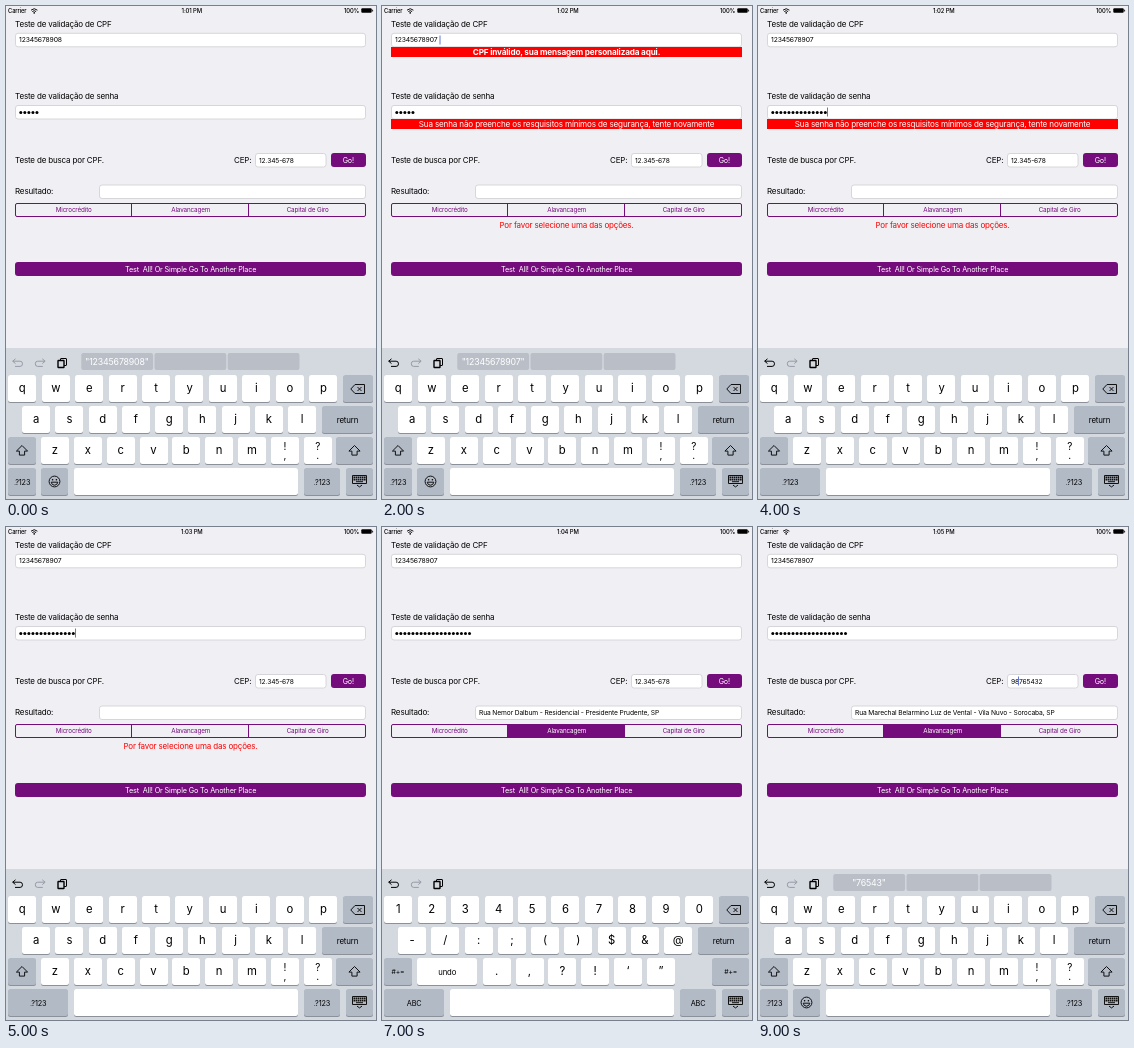
An HTML page that plays this animation: 370 px wide and 493 px high, repeating every 10000 ms.

```html
<!DOCTYPE html>
<html lang="pt-BR">
<head>
<meta charset="utf-8">
<title>Teste de validação</title>
<style>
  html, body { margin: 0; width: 100%; height: 100%; overflow: hidden; background: #efeff4; }
  svg { display: block; width: 100%; height: 100%; }
  text { font-family: Inter, sans-serif; font-size: 8px; letter-spacing: -.02em; white-space: pre; }
  .mid { text-anchor: middle; }
  .line { fill: none; stroke: #111; stroke-width: 1; }
</style>
</head>
<body>
<svg id="stage" viewBox="0 0 370 493"></svg>
<script>
const PURPLE = '#750c7b', RED = '#ff0000', WHITE = '#fff', DARK_KEY = '#b2bac6';
const BOLD = 'font-weight="700"', MEDIUM = 'font-weight="500"';

const rect = (x, y, w, h, fill, r = 0, extra = '') =>
  `<rect x="${x}" y="${y}" width="${w}" height="${h}" rx="${r}" fill="${fill}" ${extra}/>`;
const text = (x, y, str, size = 8, fill = '#000', extra = '') =>
  `<text x="${x}" y="${y}" style="font-size:${size}px;fill:${fill}" ${extra}>${str}</text>`;
const mid = (x, y, str, size, fill, extra = '') => text(x, y, str, size, fill, 'class="mid" ' + extra);
const icon = (x, y, d, color = '#111') =>
  `<path class="line" transform="translate(${x} ${y})" d="${d}" style="stroke:${color}"/>`;
const field = (x, y, w) => rect(x, y, w, 13.5, WHITE, 2.5, 'stroke="#cfcfd2" stroke-width=".8"');

const BASE = {
  clock: '1:01', cpf: '12345678908', dots: 5, cep: '12.345-678', result: '',
  cpfError: false, passError: false, choiceError: false, chosen: false,
  undo: false, hint: '', numeric: false, emoji: true, caret: null
};
const CPF_CARET = [58, 34], PASS_CARET = [69.5, 106], CEP_CARET = [260.5, 154];

// Each step lasts one second and changes only the listed properties.
const STEPS = [
  { hint: '12345678908' },
  { clock: '1:02', cpfError: true, passError: true, choiceError: true, caret: CPF_CARET },
  { cpf: '12345678907', hint: '12345678907', undo: true },
  { cpfError: false, caret: null },
  { dots: 14, hint: '', emoji: false, caret: PASS_CARET },
  { clock: '1:03', passError: false },
  { clock: '1:04', dots: 19, choiceError: false, chosen: true, numeric: true, caret: null },
  { result: 'Rua Nemor Dalbum - Residencial - Presidente Prudente, SP' },
  { clock: '1:05', cep: '98765432', hint: '76543', numeric: false, emoji: true, caret: CEP_CARET },
  { result: 'Rua Marechal Belarmino Luz de Vental - Vila Nuvo - Sorocaba, SP' }
];
let current = BASE;
const STATES = STEPS.map(step => current = { ...current, ...step });

function statusBar(s) {
  return text(2, 7, 'Carrier', 5.8, '#000', MEDIUM) +
    `<path class="line" d="M25 4.2Q28.2 1.2 31.4 4.2M26.3 5.6Q28.2 3.8 30.1 5.6"/>
     <circle cx="28.2" cy="6.9" r=".8"/>` +
    mid(185.8, 7, s.clock + ' PM', 5.9, '#000', MEDIUM) + text(338, 7, '100%', 5.8, '#000', MEDIUM) +
    rect(355.3, 2.2, 10.4, 4.6, '#000', 1) + rect(366.2, 3.6, .9, 2, '#000', .4);
}

function form(s) {
  const out = [
    text(9, 20.7, 'Teste de validação de CPF'), field(9.5, 27.3, 350),
    text(13, 36.4, s.cpf, 6.8),
    text(9, 92.9, 'Teste de validação de senha'), field(9.5, 99.5, 350),
    text(9, 156.8, 'Teste de busca por CPF.'), text(228, 156.6, 'CEP:'),
    field(249.5, 147.5, 70.5), text(253, 156.6, s.cep, 6.7),
    rect(325, 147, 35, 14, PURPLE, 3), mid(342.3, 156.7, 'Go!', 7.2, WHITE),
    text(9, 188, 'Resultado:'), field(93.5, 179, 266), text(97, 188, s.result, 6.7),
    rect(9, 256, 351, 14, PURPLE, 3),
    mid(184.7, 265.6, 'Test  All! Or Simple Go To Another Place', 7.25, WHITE)
  ];
  for (let i = 0; i < s.dots; i++)
    out.push(`<circle cx="${14.8 + 4.04 * i}" cy="106.4" r="1.5"/>`);

  if (s.chosen) out.push(rect(125.5, 197.5, 117, 13, PURPLE));
  out.push(rect(9.5, 197.5, 350, 13, 'none', 1.5, `stroke="${PURPLE}"`),
    icon(0, 0, 'M125.5 197.5V210.5M242.5 197.5V210.5', PURPLE));
  ['Microcrédito', 'Alavancagem', 'Capital de Giro'].forEach((label, i) =>
    out.push(mid(67.7 + 117 * i, 206.3, label, 6.3, s.chosen && i === 1 ? WHITE : PURPLE)));

  if (s.cpfError) out.push(rect(9, 41, 351, 10, RED),
    mid(184.5, 49, 'CPF inválido, sua mensagem personalizada aqui.', 8.2, WHITE, BOLD));
  if (s.passError) out.push(rect(9, 113, 351, 10, RED),
    mid(184.5, 121, 'Sua senha não preenche os resquisitos mínimos de segurança, tente novamente', 8.1, WHITE));
  if (s.choiceError) out.push(mid(184.5, 222, 'Por favor selecione uma das opções.', 8, RED));
  if (s.caret) out.push(rect(s.caret[0] - .5, s.caret[1] - 4.5, 1, 9, '#6478d2'));
  return out.join('');
}

function key(left, y, width, label = '', dark = false, size = dark ? 7.3 : 11.3) {
  const x = Math.round(left), w = Math.round(width);
  const cx = left + width / 2, base = y + 14 + size * (size > 8 ? .3 : .35);
  const face = rect(x, y + 1, w, 27, '#8b9099', 2.5) +
    rect(x, y, w, 27, dark ? DARK_KEY : WHITE, 2.5);
  if (label === '!,' || label === '?.')
    return face + mid(cx, y + 12.5, label[0], 10) + mid(cx, y + 21.5, label[1], 10);
  return face + mid(cx, base, label, size);
}

function toolbar(s) {
  const UNDO = 'M4-4L1.2-1.6L4 .8M1.2-1.6H8.6Q11 -1.6 11 1T8.6 3.6H3.5';
  const REDO = 'M8-4L10.8-1.6L8 .8M10.8-1.6H3.4Q1 -1.6 1 1T3.4 3.6H8.5';
  let out = icon(5.5, 356.8, UNDO, s.undo ? '#000' : '#969ca6') + icon(28.3, 356.8, REDO, '#969ca6') +
    rect(54.5, 352.5, 6, 7, '#d4d9df', .5, 'stroke="#000"') +
    rect(52, 354.5, 6, 7, '#d4d9df', .5, 'stroke="#000" stroke-width="1.4"');
  if (s.hint) {
    for (let i = 0; i < 3; i++) out += rect(75.3 + 73.2 * i, 347, 71.8, 17, '#b9bec7', 2);
    out += mid(111, 358.6, `"${s.hint}"`, 8.8, WHITE);
  }
  return out;
}

function keyboard(s) {
  const rows = s.numeric
    ? ['1234567890', '-/:;()$&@']
    : ['qwertyuiop', 'asdfghjkl'];
  const escape = c => c === '&' ? '&amp;' : c;
  const out = [rect(0, 342, 370, 151, '#d4d9df'), toolbar(s)];

  [...rows[0]].forEach((c, i) => out.push(key(2.2 + 33.45 * i, 369, 28, c)));
  [...rows[1]].forEach((c, i) => out.push(key(16 + 33.25 * i, 400, 28, escape(c))));
  out.push(key(337.3, 369, 30, '', true),
    icon(352, 383, 'M-3-4.5H6.5V4.5H-3L-7.2 0ZM-.5-2L3.5 2M3.5-2L-.5 2'),
    key(316, 400, 51, 'return', true, 7.9));

  const third = s.numeric ? ['.', ',', '?', '!', '‘', '”'] : [...'zxcvbnm', '!,', '?.'];
  const offset = s.numeric ? 2 : 0;
  third.forEach((c, i) => out.push(key(35 + 32.85 * (i + offset), 431, 27.6, c)));
  const shift = s.numeric ? '#+=' : '';
  out.push(key(2.2, 431, 27.6, shift, true, 6.8), key(330.3, 431, 37, shift, true, 6.8));
  if (s.numeric) out.push(key(35, 431, 60.4, 'undo', false, 7.7));
  else for (const x of [16, 348.5])
    out.push(icon(x, 444.5, 'M0-5L5.6 .6H2.6V4.6H-2.6V.6H-5.6Z'));

  const mode = s.numeric ? 'ABC' : '.?123';
  out.push(key(2.2, 462, s.emoji ? 27.8 : 60, mode, true),
    key(68, 462, 223.7), key(298, 462, 36, mode, true), key(340, 462, 27.3, '', true),
    icon(353.5, 473.5, 'M-7-4H7V4H-7ZM-2.5 5.6L0 7.4L2.5 5.6M-3.5 2.2H3.5'),
    `<path class="line" d="M347.5 471.3H360M347.5 473.6H360" stroke-dasharray="1.6 .5" style="stroke-width:1.7"/>`);
  if (s.emoji) out.push(key(35, 462, 27.4, '', true),
    '<circle class="line" cx="48.5" cy="475.5" r="5.4"/><circle cx="46.6" cy="473.7" r=".8"/><circle cx="50.4" cy="473.7" r=".8"/>',
    icon(48.5, 475.5, 'M-3.3 .7H3.3Q2.8 3.7 0 3.7T-3.3 .7Z'));
  return out.join('');
}

const stage = document.getElementById('stage');
const start = performance.now();
let shown = -1;

function draw(now) {
  const step = Math.floor(Math.max(0, now - start) / 1000) % STATES.length;
  if (step !== shown) {
    const s = STATES[shown = step];
    stage.innerHTML = rect(0, 0, 370, 493, '#efeff4') + statusBar(s) + form(s) + keyboard(s);
  }
  requestAnimationFrame(draw);
}
draw(start);
</script>
</body>
</html>
```
